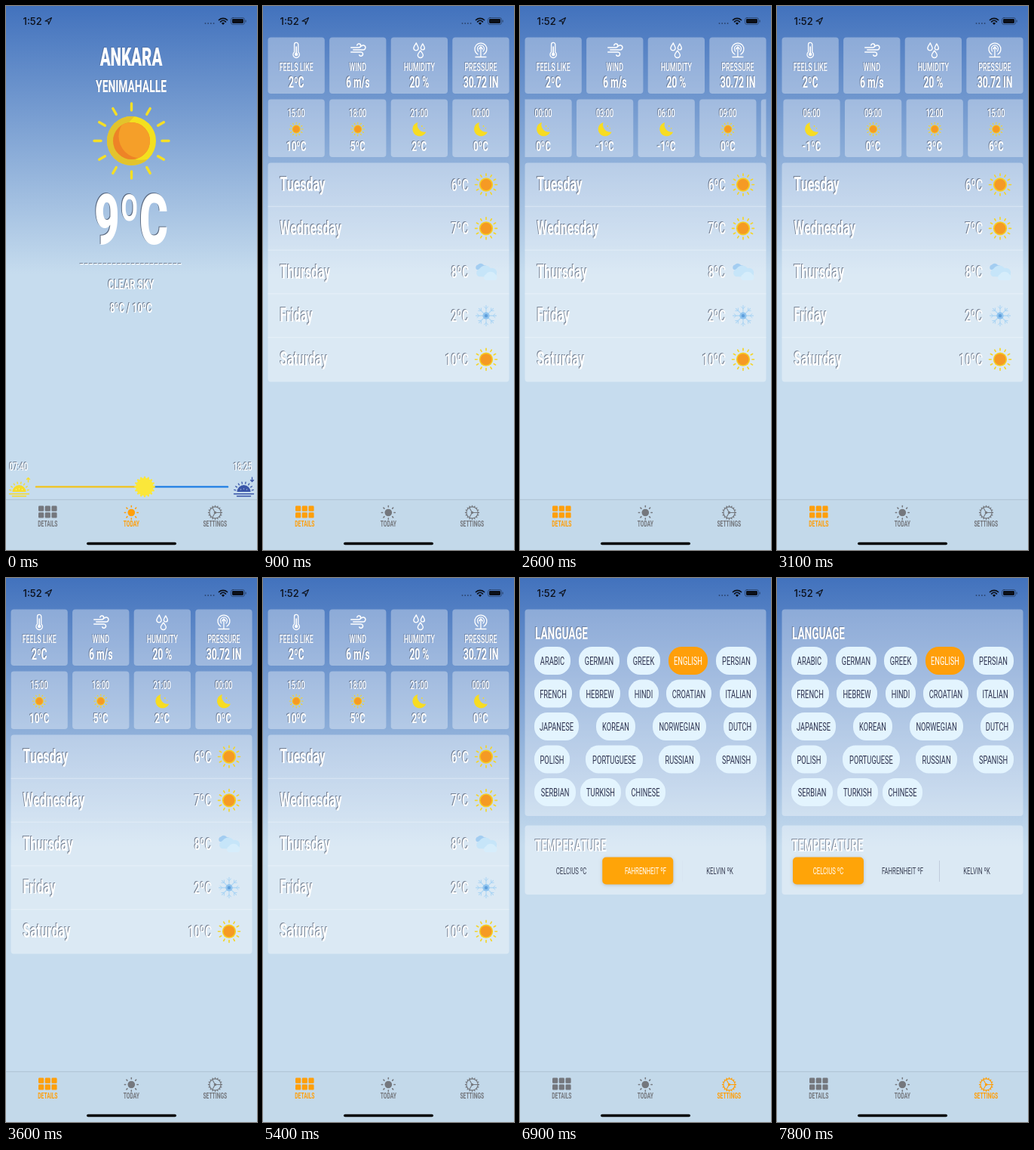
Recreate the animation shown at these times as an HTML page with a canvas. Size 333x720 px, loop 8000 ms.

```html
<!DOCTYPE html>
<html lang="en">
<head>
<meta charset="utf-8">
<title>Weather</title>
<style>
html, body { margin: 0; width: 100%; height: 100%; overflow: hidden; background: #c6dcee; }
canvas { display: block; width: 333px; height: 720px; }
</style>
</head>
<body>
<canvas id="stage"></canvas>
<script>
const W = 333, H = 720, LOOP = 8000, STEP = 100;
const CONDENSE = 0.63;
const ORANGE = '#ff9f0a', GRAY = '#74777d', YELLOW = '#f5df25';
const canvas = document.getElementById('stage');
const ctx = canvas.getContext('2d');
const dpr = window.devicePixelRatio || 1;
canvas.width = W * dpr;
canvas.height = H * dpr;

const clamp = v => Math.min(1, Math.max(0, v));
const smooth = v => v * v * (3 - 2 * v);

function text(str, x, y, size, { weight = 400, align = 'center', color = '#fff', relief = 0 } = {}) {
  ctx.font = `${weight} ${size}px Roboto, "Open Sans", sans-serif`;
  ctx.textAlign = align;
  const draw = (fill, d) => {
    ctx.save();
    ctx.translate(x + d, y + d);
    ctx.scale(CONDENSE, 1);
    ctx.fillStyle = fill;
    ctx.fillText(str, 0, 0);
    ctx.restore();
  };
  if (relief) draw(`rgba(70,80,100,${relief})`, -1);
  draw(color, 0);
}

function box(x, y, w, h, r, fill) {
  ctx.beginPath();
  ctx.roundRect(x, y, w, h, r);
  ctx.fillStyle = fill;
  ctx.fill();
}

function disc(x, y, r, fill) {
  ctx.beginPath();
  ctx.arc(x, y, r, 0, Math.PI * 2);
  ctx.fillStyle = fill;
  ctx.fill();
}

function line(points, color, width, cap = 'round') {
  ctx.beginPath();
  points.forEach(([x, y], i) => i ? ctx.lineTo(x, y) : ctx.moveTo(x, y));
  ctx.strokeStyle = color;
  ctx.lineWidth = width;
  ctx.lineCap = cap;
  ctx.stroke();
}

function shape(d, color, width) {
  const path = new Path2D(d);
  if (width) {
    ctx.strokeStyle = color;
    ctx.lineWidth = width;
    ctx.lineCap = ctx.lineJoin = 'round';
    ctx.stroke(path);
  } else {
    ctx.fillStyle = color;
    ctx.fill(path);
  }
}

function at(x, y, draw) {
  ctx.save();
  ctx.translate(x, y);
  draw();
  ctx.restore();
}

function inDisc(x, y, r, draw) {
  ctx.save();
  ctx.beginPath();
  ctx.arc(x, y, r, 0, Math.PI * 2);
  ctx.clip();
  draw();
  ctx.restore();
}

function rays(x, y, count, r0, r1, color, width, from = 0, span = Math.PI * 2) {
  for (let i = 0; i < count; i++) {
    const a = from + i * span / count, c = Math.cos(a), s = Math.sin(a);
    line([[x + c * r0, y + s * r0], [x + c * r1, y + s * r1]], color, width);
  }
}

// Weather icons

function bigSun(x, y) {
  rays(x, y, 12, 40.5, 49.5, YELLOW, 3.4);
  disc(x, y, 32.5, '#f3e01f');
  inDisc(x, y, 32.5, () =>
    shape(`M${x + 6} ${y - 34}Q${x - 17} ${y - 15} ${x - 9} ${y + 14}Q${x - 2} ${y + 29} ${x + 24} ${y + 24}L${x} ${y + 40}H${x - 40}V${y - 40}Z`, '#e3c32c'));
  disc(x, y, 24.5, '#ee8326');
  inDisc(x, y, 24.5, () => disc(x + 12, y - 6, 29, '#f59f29'));
}

function sun(x, y, r) {
  rays(x, y, 12, r * 0.82, r, '#f3d52a', r * 0.1 + 0.2);
  disc(x, y, r * 0.63, '#f5cf25');
  disc(x, y, r * 0.52, '#f59a24');
}

function moon(x, y) {
  at(x, y, () => {
    shape('M-2 -9A9.3 9.3 0 1 0 9 3.5A9.5 9.5 0 0 1 -2 -9Z', '#f7dc22');
    disc(3.5, -4, 0.9, '#f7dc22');
    disc(6.5, -1, 0.7, '#f7dc22');
  });
}

function cloud(x, y) {
  at(x, y, () => {
    shape('M-12 -3A3.5 3.5 0 0 1 -11 -9.5A5 5 0 0 1 -3 -9A4 4 0 0 1 1 -3Z', '#a3cdf1');
    shape('M-10 6A5.5 5.5 0 0 1 -9 -4A9 9 0 0 1 6 -5A6 6 0 0 1 14 2A4.5 4.5 0 0 1 10 7Z', '#c6e5f9');
    shape('M-1 11A4.5 4.5 0 0 1 0 3A7 7 0 0 1 12 3A4.2 4.2 0 0 1 11 11Z', '#d6edfb');
  });
}

function snowflake(x, y) {
  at(x, y, () => {
    for (let i = 0; i < 8; i++) {
      ctx.rotate(Math.PI / 4);
      line([[0, 4], [0, 13.5]], '#acd5f4', 1.1);
      line([[-2.5, 12], [0, 9], [2.5, 12]], '#acd5f4', 1);
    }
    disc(0, 0, 4.6, '#8fc3ee');
    disc(0, 0, 2.2, '#5f9fdc');
  });
}

const ICONS = { sun: (x, y) => sun(x, y, 9), moon, cloud, snowflake };

const METRICS = [
  ['FEELS LIKE', '2ºC', () => {
    shape('M-2.6 3V-7A2.6 2.6 0 0 1 2.6 -7V3A4.2 4.2 0 1 1 -2.6 3Z', '#fff', 1.3);
    disc(0, 6, 2.2, '#fff');
    line([[0, -4], [0, 6]], '#fff', 1.6);
  }],
  ['WIND', '6 m/s', () =>
    shape('M-9 -3H1A2.5 2.5 0 1 0 -1 -6M-6 0H7A3 3 0 1 0 5 -5M-9 3H4A2.6 2.6 0 1 1 2 7', '#fff', 1.5)],
  ['HUMIDITY', '20 %', () => {
    shape('M-4 -9C-6 -6 -7.5 -4 -7.5 -2.3A3 3 0 0 0 -1.2 -2.3C-1.2 -4 -3 -6 -4 -9Z', '#fff', 1.4);
    shape('M4.5 -8C3 -5 2 -4 2 -2.6A2.5 2.5 0 0 0 7 -2.6C7 -4 6 -5 4.5 -8Z', '#fff', 1.4);
    shape('M1.5 1C-.5 4 -2 5 -2 7A3.5 3.5 0 0 0 5 7C5 5 3.5 4 1.5 1Z', '#fff', 1.4);
  }],
  ['PRESSURE', '30.72 IN', () => {
    shape('M-4 6A8 8 0 1 1 4 6M-7 9.5H7M0 9V-4M-2.5 -1L0 -4L2.5 -1', '#fff', 1.3);
    shape('M-3 2A4.6 4.6 0 1 1 3 2', '#fff', 1.1);
  }]
];

const HOURS = [
  ['15:00', '10', 'sun'], ['18:00', '5', 'sun'], ['21:00', '2', 'moon'],
  ['00:00', '0', 'moon'], ['03:00', '-1', 'moon'], ['06:00', '-1', 'moon'],
  ['09:00', '0', 'sun'], ['12:00', '3', 'sun'], ['15:00', '6', 'sun']
];

const DAYS = [
  ['Tuesday', '6', 'sun'], ['Wednesday', '7', 'sun'], ['Thursday', '8', 'cloud'],
  ['Friday', '2', 'snowflake'], ['Saturday', '10', 'sun']
];

// name, left edge, width
const LANGUAGES = [
  [['ARABIC', 19, 48], ['GERMAN', 78, 54], ['GREEK', 142, 44], ['ENGLISH', 197, 52], ['PERSIAN', 260, 54]],
  [['FRENCH', 19, 50], ['HEBREW', 79, 54], ['HINDI', 144, 40], ['CROATIAN', 194, 60], ['ITALIAN', 265, 49]],
  [['JAPANESE', 19, 59], ['KOREAN', 101, 52], ['NORWEGIAN', 176, 71], ['DUTCH', 270, 44]],
  [['POLISH', 19, 47], ['PORTUGUESE', 87, 76], ['RUSSIAN', 184, 55], ['SPANISH', 260, 54]],
  [['SERBIAN', 19, 55], ['TURKISH', 80, 54], ['CHINESE', 140, 53]]
];

const UNITS = ['CELCIUS ºC', 'FAHRENHEIT ºF', 'KELVIN ºK'];

// Pages

function horizon(x, y, color, arrow) {
  at(x, y, () => {
    shape('M-9 0A9 9 0 0 1 9 0Z', color);
    rays(0, 0, 8, 11, 13, color, 1.3, Math.PI * 1.0625, Math.PI);
    line([[-13, 2.7], [13, 2.7]], color, 1.4);
    line([[-9, 5.8], [9, 5.8]], color, 1.4);
    for (let i = -1; i < 2; i++) disc(i * 4, -4 + Math.abs(i), 0.7, 'rgba(255,255,255,.6)');
    shape(arrow, color, 1.3);
  });
}

function today() {
  text('ANKARA', 166, 79, 32.5, { weight: 800, relief: 0.3 });
  text('YENIMAHALLE', 166, 114, 22, { weight: 700, relief: 0.3 });
  bigSun(166.5, 178.5);
  text('9ºC', 166, 314.5, 92, { weight: 800, relief: 0.75 });

  ctx.setLineDash([4.5, 1.7]);
  line([[97.5, 340.6], [232, 340.6]], 'rgba(70,80,100,.7)', 1, 'butt');
  line([[98.5, 341.6], [233, 341.6]], '#fff', 1.2, 'butt');
  ctx.setLineDash([]);

  text('CLEAR SKY', 166, 375, 18.7, { weight: 600, relief: 0.65 });
  text('8ºC / 10ºC', 166, 405.5, 18.5, { weight: 600, relief: 0.65 });
  text('07:40', 4.5, 614.5, 15.5, { weight: 500, align: 'left', relief: 0.65 });
  text('18:25', 326.5, 614.5, 15.5, { weight: 500, align: 'right', relief: 0.65 });

  const y = 636.4;
  line([[40, y], [184, y]], '#f2c41d', 2.4);
  line([[184, y], [294, y]], '#1e7ee4', 2.4);
  rays(184, y, 16, 10, 12.6, '#fbe73a', 2.6);
  disc(184, y, 11.6, '#fbe73a');
  horizon(17.5, 643, '#f6dc2c', 'M12 -13V-18M10 -16.5L12 -18.5L14 -16.5');
  horizon(315.5, 643, '#3955a8', 'M11 -19V-14M9 -15.5L11 -13.5L13 -15.5');
}

function details(scroll) {
  const pitch = 81.6, left = 6.5, wide = 75.3;
  METRICS.forEach(([label, value, icon], i) => {
    const x = left + i * pitch, mid = x + wide / 2;
    box(x, 41.5, wide, 74.5, 4, 'rgba(255,255,255,.34)');
    at(mid, 58, icon);
    text(label, mid, 86, 14, { weight: 500, relief: 0.4 });
    text(value, mid, 108, 19.3, { weight: 700, relief: 0.5 });
  });

  ctx.save();
  ctx.beginPath();
  ctx.rect(left, 120, 320, 84);
  ctx.clip();
  HOURS.forEach(([hour, temp, icon], i) => {
    const x = left + i * pitch - scroll, mid = x + wide / 2;
    box(x, 123.5, wide, 76.5, 4, 'rgba(255,255,255,.34)');
    text(hour, mid, 147, 14.4, { weight: 500, relief: 0.6 });
    ICONS[icon](mid, 163);
    text(temp + 'ºC', mid, 192, 18.6, { weight: 700, relief: 0.55 });
  });
  ctx.restore();

  box(left, 207.5, 320, 290, 4, 'rgba(255,255,255,.36)');
  DAYS.forEach(([day, temp, icon], i) => {
    const y = 236.5 + i * 57.8;
    if (i) line([[left, y - 29], [left + 320, y - 29]], 'rgba(255,255,255,.35)', 1, 'butt');
    text(day, 22.5, y + 8.5, 25.2, { weight: 700, align: 'left', relief: 0.65 });
    text(temp + 'ºC', 273, y + 8, 22, { weight: 500, align: 'right', relief: 0.65 });
    if (icon === 'sun') sun(296, y, 14.5);
    else ICONS[icon](296, y);
  });
}

function settings(slide) {
  box(6.5, 41.5, 320, 273.5, 4, 'rgba(255,255,255,.34)');
  text('LANGUAGE', 20, 81, 21.5, { weight: 700, align: 'left', relief: 0.5 });
  LANGUAGES.forEach((row, i) => row.forEach(([name, x, w]) => {
    const mid = 109.5 + i * 43.5, on = name === 'ENGLISH';
    box(x, mid - 18.5, w, 37, 17.5, on ? ORANGE : '#e3f4fe');
    text(name, x + w / 2, mid + 5.5, 14.8, { color: on ? '#fff' : '#2f3450' });
  }));

  box(6.5, 327.5, 320, 91.5, 4, 'rgba(255,255,255,.36)');
  text('TEMPERATURE', 20, 362, 21.5, { weight: 700, align: 'left', relief: 0.6 });
  const pitch = 98.5;
  [1, 2].forEach(i => {
    const gap = Math.min(Math.abs(slide - i), Math.abs(slide - i + 1));
    const x = 18.5 + i * pitch;
    line([[x, 374], [x, 402]], `rgba(130,140,165,${0.3 * clamp(gap)})`, 1, 'butt');
  });
  ctx.save();
  ctx.shadowColor = 'rgba(0,0,0,.18)';
  ctx.shadowBlur = 4 * dpr;
  ctx.shadowOffsetY = dpr;
  box(21 + slide * pitch, 369.5, 94, 36, 5, '#ffa408');
  ctx.restore();
  UNITS.forEach((unit, i) => {
    const on = Math.abs(slide - i) < 0.5;
    text(unit, 68 + i * pitch, 391.5, 12.3, { color: on ? '#fff' : '#3a4055' });
  });
}

// Frame around the pages

function backdrop() {
  const g = ctx.createLinearGradient(0, 0, 0, 355);
  g.addColorStop(0, '#4272bd');
  g.addColorStop(1, '#c6dcee');
  ctx.fillStyle = g;
  ctx.fillRect(0, 0, W, H);
}

function statusBar() {
  ctx.font = '500 13px Inter, "Liberation Sans", sans-serif';
  ctx.textAlign = 'left';
  ctx.fillStyle = '#0b0f18';
  ctx.fillText('1:52', 22.5, 24.5);
  shape('M52 20L60.5 15.5L56.5 24.2L56 20.3Z', '#0b0f18', 1.1);
  for (let i = 0; i < 4; i++) disc(264.5 + i * 3.7, 23, 0.9, '#2c4670');
  shape('M282.5 18.5A8 8 0 0 1 293.5 18.5M284.6 20.8A5 5 0 0 1 291.4 20.8', '#0b0f18', 1.7);
  shape('M288 25L285.9 22.8A3 3 0 0 1 290.1 22.8Z', '#0b0f18');
  ctx.beginPath();
  ctx.roundRect(298.5, 15.5, 18, 9, 2.6);
  ctx.strokeStyle = 'rgba(11,15,24,.45)';
  ctx.lineWidth = 0.9;
  ctx.stroke();
  box(300, 17, 15, 6, 1.4, '#0b0f18');
  box(317.5, 18.5, 1.2, 3, 0.6, 'rgba(11,15,24,.45)');
}

function tabBar(active) {
  const tint = i => i === active ? ORANGE : GRAY;
  box(0, 653, W, 67, 0, 'rgba(190,208,226,.3)');
  line([[0, 653.3], [W, 653.3]], '#a9bccd', 0.8, 'butt');
  for (let i = 0; i < 6; i++) {
    box(43 + (i % 3) * 8.7, 661.5 + Math.floor(i / 3) * 8.8, 7.2, 7.3, 1.4, tint(0));
  }
  disc(166.3, 670.5, 4.8, tint(1));
  rays(166.3, 670.5, 8, 7.6, 9, tint(1), 1.5);
  at(277.5, 670.5, () => {
    rays(0, 0, 16, 8, 9, tint(2), 1.3);
    shape('M7.6 0A7.6 7.6 0 1 1 -7.6 0A7.6 7.6 0 1 1 7.6 0Z', tint(2), 1.2);
    rays(0, 0, 3, 1.5, 7.4, tint(2), 1.1);
    disc(0, 0, 1.7, tint(2));
  });
  ['DETAILS', 'TODAY', 'SETTINGS'].forEach((label, i) =>
    text(label, 55.3 + i * 111, 689.3, 10.7, { weight: 700, color: tint(i) }));
  box(107, 709.7, 119, 3.6, 1.8, '#000');
}

function scrollAt(t) {
  if (t < 3150) return 408 * (1 - Math.pow(1 - clamp((t - 2200) / 950), 1.83));
  return 406 * Math.pow(1 - clamp((t - 3100) / 500), 1.8);
}

function slideAt(t) {
  return smooth(clamp((t - 6500) / 500)) - smooth(clamp((t - 7300) / 500));
}

function render(now) {
  const t = Math.floor(now % LOOP / STEP) * STEP;
  const page = t < 500 ? 1 : t < 5600 ? 0 : 2;
  ctx.setTransform(dpr, 0, 0, dpr, 0, 0);
  backdrop();
  if (page === 1) today();
  else if (page === 0) details(scrollAt(t));
  else settings(slideAt(t));
  tabBar(page);
  statusBar();
}

const start = performance.now();
function tick() {
  render(performance.now() - start);
  requestAnimationFrame(tick);
}
tick();
</script>
</body>
</html>
```
